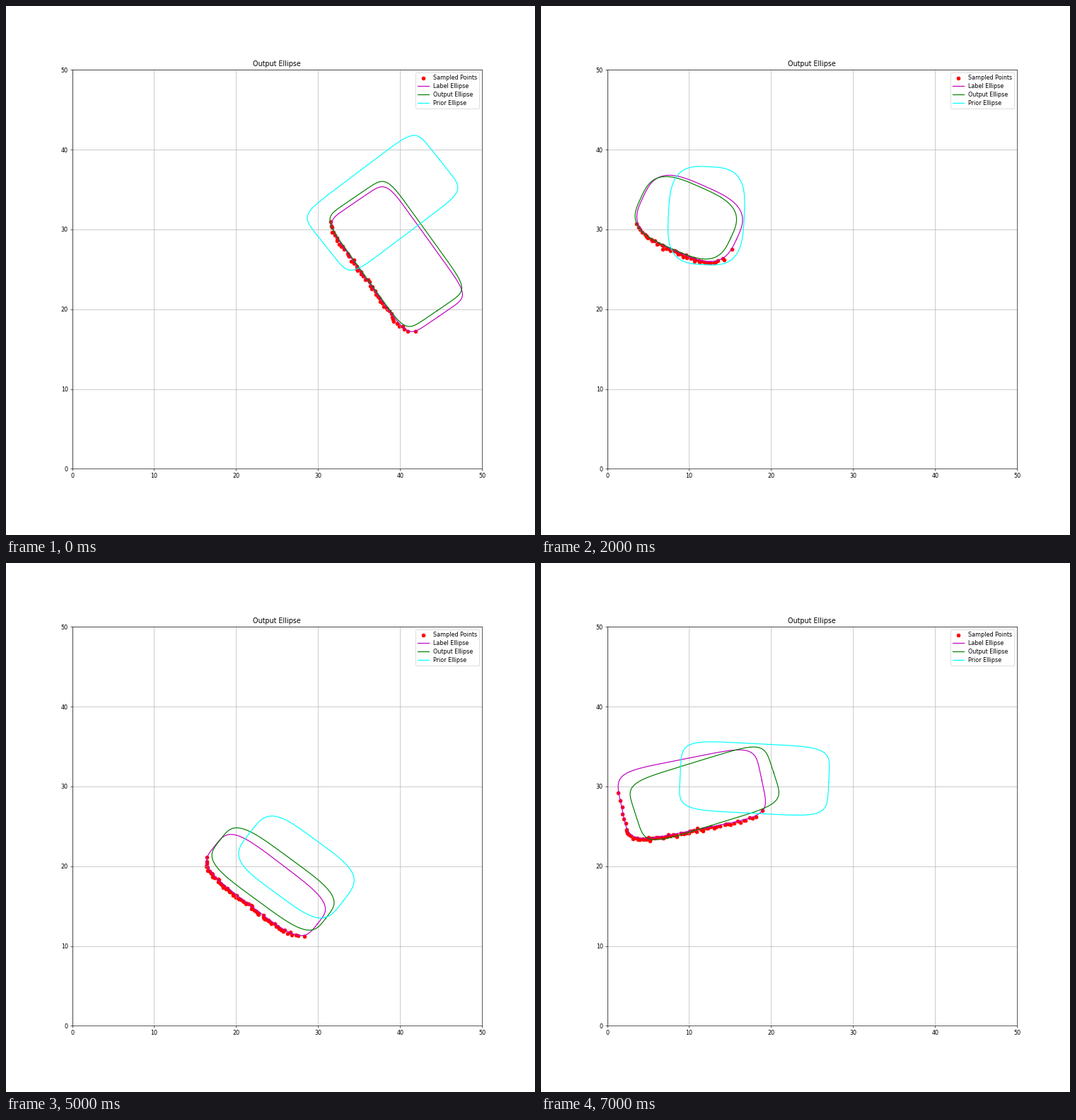
These frames come from a looping animation (748 by 748 pixels, 8000 ms). A matplotlib script:

```python
import matplotlib.pyplot as plt
import numpy as np
from matplotlib.animation import FuncAnimation

SIZE, DPI = 748, 57.6
BEAM_STEP = np.radians(0.45)
NAMES = ("Label", "Output", "Prior")
COLORS = ("m", "g", "cyan")

# Per scene: squareness, then label, output and prior as
# centre x, centre y, half length, half width, tilt in degrees.
SCENES = [
    (7.5, (39.64, 26.27, 8.78, 4.50, -55), (39.48, 26.92, 8.71, 4.65, -55),
     (37.86, 33.33, 8.80, 4.87, 37.7)),
    (4.5, (38.82, 10.44, 1.52, 6.38, 2), (38.80, 12.59, 2.19, 6.40, 2.5),
     (39.42, 6.27, 1.95, 6.53, -5.5)),
    (3.2, (10.07, 31.38, 6.28, 4.43, -24.5), (9.60, 31.45, 6.03, 4.23, -24.5),
     (12.10, 31.72, 4.62, 6.14, -3)),
    (3.0, (11.60, 26.55, 3.85, 2.57, -60), (11.90, 27.05, 3.95, 2.65, -60),
     (12.85, 27.80, 4.00, 2.70, -65)),
    (3.0, (32.99, 26.45, 5.02, 2.54, -29.5), (33.01, 27.00, 5.15, 2.94, -29),
     (33.31, 27.84, 2.84, 5.02, 8)),
    (4.0, (23.65, 17.65, 7.94, 3.20, -38), (24.50, 18.40, 8.10, 3.30, -37),
     (27.35, 19.90, 7.12, 4.12, -37)),
    (8.0, (17.72, 14.70, 3.60, 1.48, -53.5), (18.48, 15.96, 3.68, 2.00, -52.5),
     (28.68, 10.96, 3.80, 1.46, -56.5)),
    (5.6, (10.33, 29.04, 8.71, 4.49, 11.5), (11.88, 29.13, 8.82, 4.08, 17.5),
     (17.97, 30.99, 9.07, 4.36, -3)),
]


def oval(n, cx, cy, a, b, tilt):
    """Tilted superellipse, counterclockwise."""
    t = np.linspace(0, 2 * np.pi, 721)
    r = (abs(np.cos(t)) ** n + abs(np.sin(t)) ** n) ** (-1 / n)
    u, v = a * r * np.cos(t), b * r * np.sin(t)
    c, s = np.cos(np.radians(tilt)), np.sin(np.radians(tilt))
    return cx + c * u - s * v, cy + s * u + c * v


def scan(x, y, seed):
    """Noisy hits of evenly spaced beams from the origin on the near side."""
    bearing = np.arctan2(y, x)
    near = np.gradient(bearing) < 0
    x, y, bearing = x[near], y[near], bearing[near]
    order = np.argsort(bearing)
    beams = np.arange(bearing.min(), bearing.max(), BEAM_STEP)
    hits = np.column_stack([np.interp(beams, bearing[order], axis[order])
                            for axis in (x, y)])
    rays = np.column_stack([np.cos(beams), np.sin(beams)])
    noise = np.random.default_rng(seed).normal(0, 0.11, hits.shape)
    return hits - 0.13 * rays + noise


# The small margin keeps the pixel size from rounding down.
side = (SIZE + 0.005) / DPI
fig, ax = plt.subplots(figsize=(side, side), dpi=DPI, facecolor="white")
fig.subplots_adjust(left=0.125, right=0.9, bottom=0.125, top=0.8795)
ax.set(xlim=(0, 50), ylim=(0, 50), title="Output Ellipse")
ax.grid(True)

dots = ax.scatter([], [], color="red", label="Sampled Points")
lines = [ax.plot([], [], color=color, label=f"{name} Ellipse")[0]
         for name, color in zip(NAMES, COLORS)]
ax.legend(loc="upper right", labelspacing=0.375, borderpad=0.35)


def update(i):
    n, *ovals = SCENES[i]
    curves = [oval(n, *shape) for shape in ovals]
    for line, curve in zip(lines, curves):
        line.set_data(*curve)
    dots.set_offsets(scan(*curves[0], seed=i))
    return [dots, *lines]


anim = FuncAnimation(fig, update, frames=len(SCENES), interval=1000,
                     repeat=True, repeat_delay=0)
plt.show()
```
